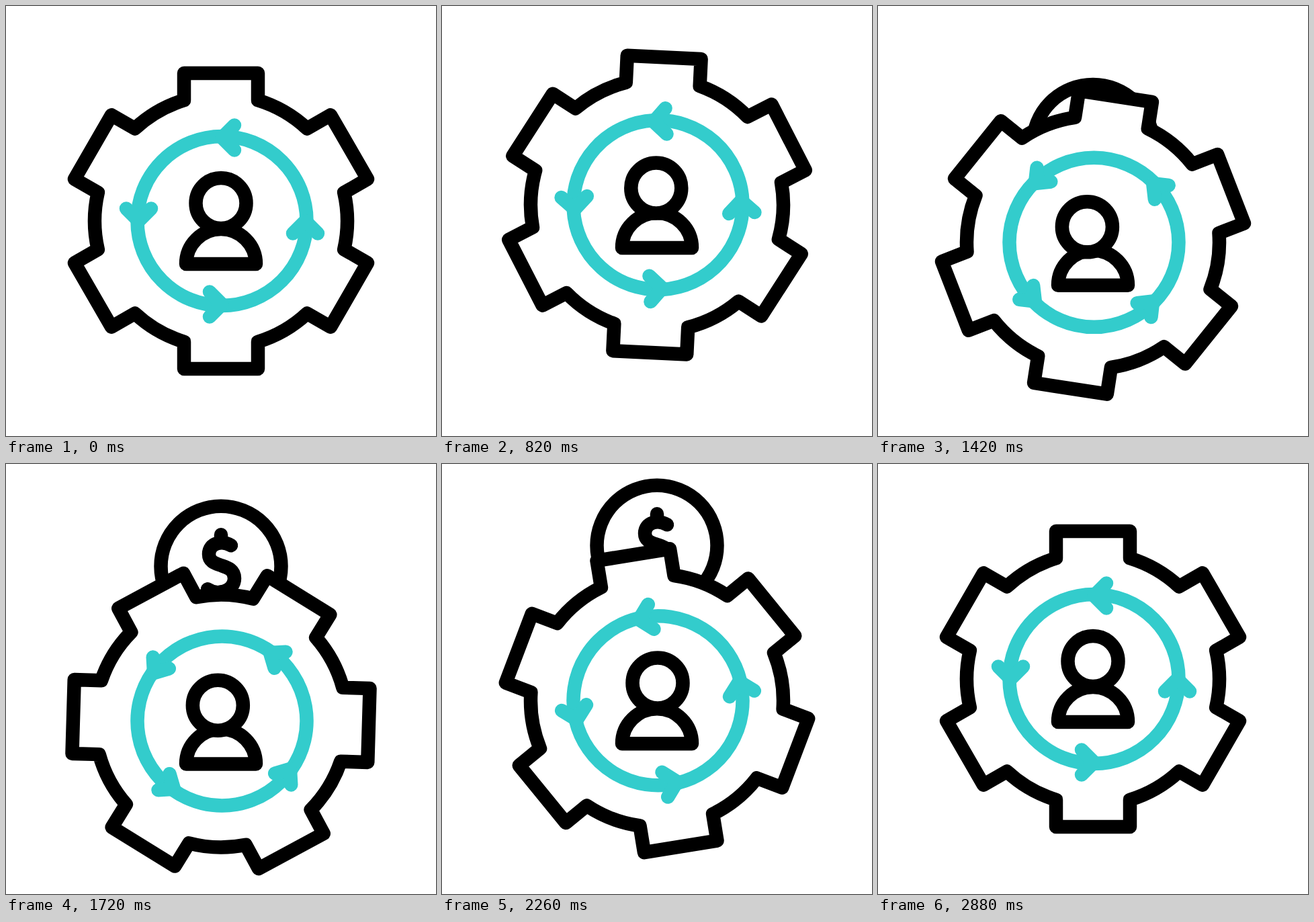
An HTML page that plays this animation: 640x640 px, repeating every 3.28 s.

```html
<!DOCTYPE html>
<html lang="en">
<head>
<meta charset="utf-8">
<title>Gear process</title>
<style>
  html, body { margin: 0; width: 100%; height: 100%; overflow: hidden; background: #fff; }
  svg { display: block; width: 100%; height: 100%; }
  g { stroke-width: 20.5; stroke-linecap: round; stroke-linejoin: round; }
  .ink { stroke: #000; fill: none; }
  .teal { stroke: #33cccc; fill: none; }
  .solid { fill: #fff; }
</style>
</head>
<body>
<svg viewBox="0 0 640 640">
  <g id="coin" class="ink">
    <circle r="89.5" class="solid"/>
    <path d="M0-47V-36M0 38V49M15-31C2-39-18-35-18-18C-18-6-7-4 1-1C10 2 20 5 20 18C20 36-4 45-20 34"/>
  </g>
  <g id="gear" class="ink"><path id="rim" class="solid"/></g>
  <g id="cycle" class="teal">
    <circle r="126"/>
    <path id="arrows"/>
  </g>
  <g id="person" class="ink">
    <path d="M-52 64A52 52 0 0 1 52 64Z"/>
    <circle id="head" r="37.5" class="solid"/>
  </g>
</svg>
<script>
const LOOP = 3280, STEP = 20, BEGIN = 300, END = 2880;
const el = id => document.getElementById(id);

// Progress of a move that eases in and out between two times
function move(t, from, to) {
  const u = Math.min(1, Math.max(0, (t - from) / (to - from)));
  return u * u * (3 - 2 * u);
}

function turn([x, y], deg) {
  const r = deg * Math.PI / 180, c = Math.cos(r), s = Math.sin(r);
  return [x * c - y * s, x * s + y * c].map(n => n.toFixed(2)).join(' ');
}

function rimPath() {
  const R = 188, half = 55, top = -220, base = -Math.sqrt(R * R - half * half);
  let d = '';
  for (let a = 0; a < 360; a += 60) {
    const p = (x, y) => turn([x, y], a);
    d += (a ? `A${R} ${R} 0 0 1 ` : 'M') + p(-half, base)
      + `L${p(-half, top)}L${p(half, top)}L${p(half, base)}`;
  }
  return d + `A${R} ${R} 0 0 1 ${turn([-half, base], 0)}Z`;
}

function arrowPath(h) {
  const depth = 18.5, R = 124;
  let d = '';
  for (let a = 0; a < 360; a += 90)
    d += `M${turn([depth, -R - h], a)}L${turn([0, -R], a)}L${turn([depth, -R + h], a)}`;
  return d;
}

function place(id, x, y, deg = 0) {
  el(id).setAttribute('transform', `translate(${x} ${y}) rotate(${deg})`);
}

function draw(t) {
  const windUp = move(t, BEGIN, 640);
  const settle = move(t, 2400, END);
  const rest = move(t, 2480, END);

  // The gear dips up, sinks to make room for the coin, then overshoots back
  const cy = 320 - 27 * move(t, BEGIN, 760) + 104 * move(t, 680, 2040)
    - 89.5 * move(t, 2040, 2480) + 12.5 * rest;
  const gear = 4.6 * windUp - 134.2 * move(t, 710, 2310) + 9.6 * settle;

  // The arrows turn in two halves and fold their arms in between
  const cycle = 4.8 * windUp - 49.8 * move(t, 640, 1360)
    - 60.5 * move(t, 1500, 2360) + 15.5 * settle;
  const spread = 18.5 + 3.5 * (windUp - rest)
    + 7.3 * (move(t, 2040, 2440) - move(t, 640, 1060));

  const headX = -8.6 * move(t, 640, 1400) + 10.6 * move(t, 1480, 2060) - 2 * move(t, 2080, 2440);
  const headY = 3.5 * (move(t, 640, 1060) - move(t, 1600, 2400));
  const coinY = 320 - 211.5 * (move(t, 560, 2200) - move(t, 2200, 2600));

  place('coin', 320, coinY);
  place('gear', 320, cy, gear);
  place('cycle', 321.5, cy, cycle);
  el('arrows').setAttribute('d', arrowPath(spread));
  place('person', 320, cy);
  place('head', headX, headY - 26.5);
}

el('rim').setAttribute('d', rimPath());
const start = performance.now();
function tick() {
  const t = (performance.now() - start) % LOOP;
  draw(Math.floor(t / STEP) * STEP);
  requestAnimationFrame(tick);
}
tick();
</script>
</body>
</html>
```
